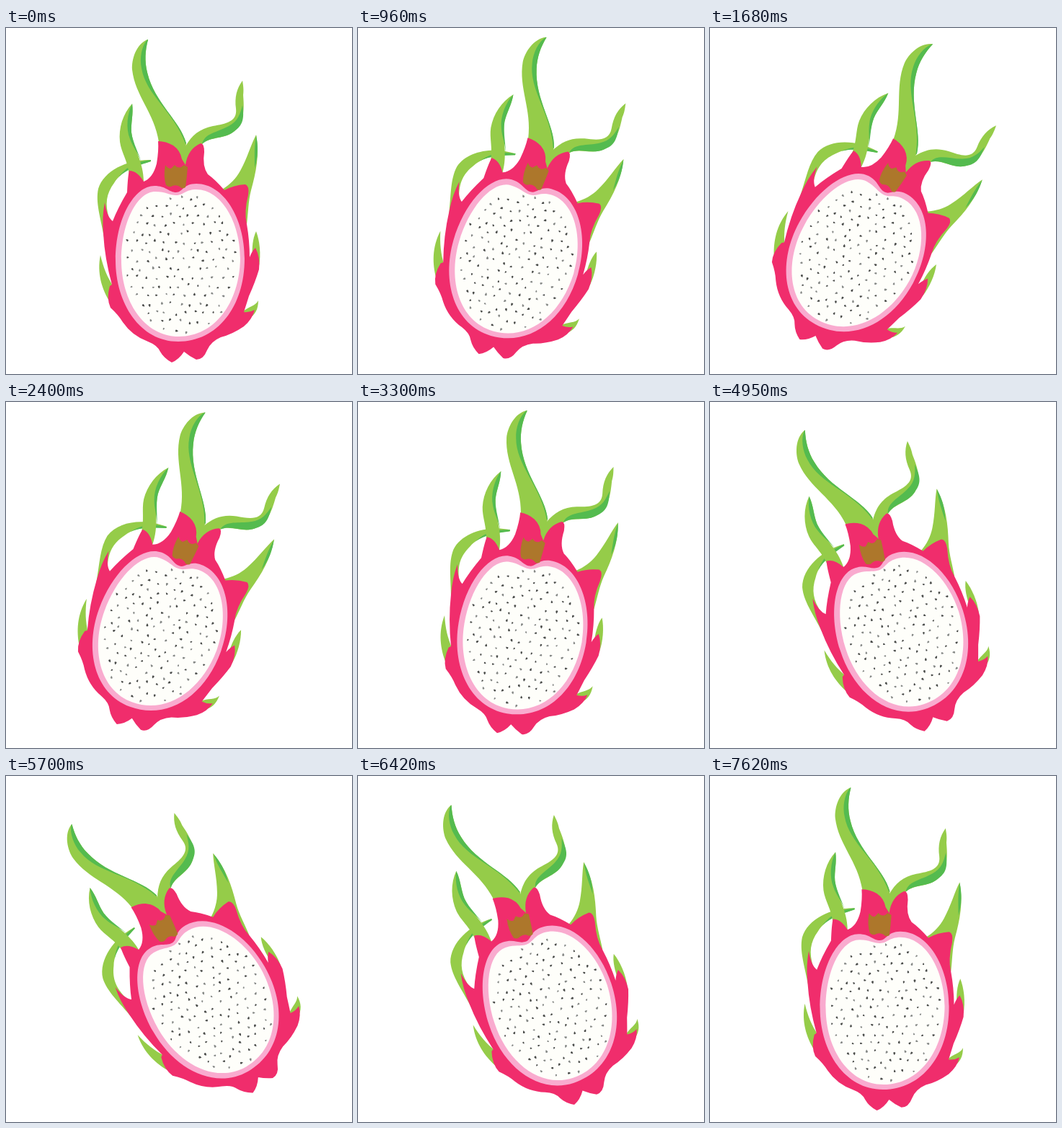
An HTML page with a canvas for the animation above (7650 ms loop, 480x480 px).

```html
<!DOCTYPE html>
<html lang="en">
<head>
<meta charset="utf-8">
<title>Swinging dragon fruit</title>
<style>
  html, body { margin: 0; width: 100%; height: 100%; overflow: hidden; background: #fff; }
  canvas { display: block; width: 100vw; height: 100vh; object-fit: contain; }
</style>
</head>
<body>
<canvas id="stage" width="480" height="480"></canvas>
<script>
const ctx = document.getElementById('stage').getContext('2d');
const LOOP = 7650;
const LIGHT = '#95cc49', DARK = '#54bb4f', PINK = '#f02d6c';
const RING = '#f9abcf', FLESH = '#fefefa', BROWN = '#ad772b';

// Swing angle in degrees at key times in ms
const swing = [
  [0, 0], [1770, 30], [2400, 20.1], [3120, 12.5], [4200, -5.1],
  [5715, -30], [6420, -18.1], [7020, -8.5], [LOOP, 0]
];

const shape = (color, d) => ({ color, path: new Path2D(d) });

const leaves = [
  // left curl
  shape(LIGHT, 'M201 183 C170 182 136 197 128 223 C124 242 131 262 136 290 L143 264 C137 244 139 230 150 215 C161 197 183 190 201 185 Z'),
  shape(DARK, 'M201 183 C184 185 169 190 156 207 C168 195 186 190 201 185 Z'),
  // tall top leaf
  shape(LIGHT, 'M196 16 C180 23 174 44 175 58 C179 94 206 118 212 158 L247 192 L250 160 C242 129 206 104 196 62 C192 46 193 31 197 16 Z'),
  shape(DARK, 'M196 16 C188 25 185 42 188 56 C194 93 233 116 249 161 L250 160 C242 129 206 104 196 62 C192 46 193 31 197 16 Z'),
  // curved leaf to the right of it
  shape(LIGHT, 'M328 73 C320 84 317 96 319 112 C321 130 305 133 287 136 C268 140 258 149 249 164 L244 192 L258 190 L272 161 C284 150 303 155 317 143 C332 130 330 108 329 93 C330 85 329 80 328 73 Z'),
  shape(DARK, 'M272 161 C275 146 293 145 309 136 C322 129 325 119 328 107 C331 127 328 135 317 143 C303 155 285 149 272 161 Z'),
  // upper left leaf
  shape(LIGHT, 'M175 105 C162 119 156 139 158 158 C160 173 169 184 171 205 L191 213 C191 186 177 168 174 145 C173 131 177 120 175 105 Z'),
  shape(DARK, 'M175 105 C168 119 166 139 172 154 C176 166 184 173 189 190 C185 175 176 160 174 145 C173 131 177 120 175 105 Z'),
  // right leaf
  shape(LIGHT, 'M347 148 C340 161 335 180 325 198 C319 209 311 217 300 224 L334 272 C336 258 336 240 340 225 C347 200 352 176 347 148 Z'),
  shape(DARK, 'M347 149 C344 166 345 178 345 194 C350 178 350 164 347 149 Z'),
  // small side shoots
  shape(LIGHT, 'M347 282 C342 292 341 306 342 320 L351 330 C354 314 352 295 347 282 Z'),
  shape(LIGHT, 'M350 378 C346 386 337 386 328 394 L336 404 C346 398 350 390 350 378 Z'),
  shape(LIGHT, 'M131 315 C126 340 133 362 144 380 L150 360 C140 345 135 332 131 315 Z')
];

const fruit = [
  shape(PINK, 'M230 440 L230 200 L249 190 Q252 168 270 160 Q275 160 275 172 Q272 192 280 203 Q290 210 303 225 Q316 218 332 217 Q338 219 336 232 Q330 255 334 272 Q338 295 338 318 Q341 310 346 305 Q353 318 351 335 Q346 352 337 372 Q333 385 330 394 Q338 395 345 391 Q342 404 330 414 Q314 425 298 429 Q284 435 279 447 Q274 460 264 460 Q254 455 247 449 Z'),
  shape(PINK, 'M247 449 Q240 460 230 464 Q219 458 214 449 Q210 440 197 435 Q175 427 162 408 Q156 398 145 388 Q139 375 144 358 L147 356 Q137 320 135 285 Q133 262 137 242 Q140 262 148 268 Q155 250 168 228 Q169 205 171 198 Q182 198 191 213 Q204 208 209 188 Q212 170 211 157 Q222 157 232 163 Q242 170 244 182 L249 190 L260 300 Z'),
  shape(RING, 'M236 228 C245 228 246 216 264 216 C302 216 331 264 331 320 C331 387 293 435 239 435 C186 435 152 382 152 322 C152 264 178 219 206 219 C222 219 226 228 236 228 Z'),
  shape(FLESH, 'M236 232 C246 232 249 224 264 224 C299 224 325 270 325 320 C324 382 289 428 240 428 C191 428 160 378 160 322 C160 270 182 227 207 227 C222 227 226 232 236 232 Z'),
  shape(BROWN, 'M221 190 Q224 195 229 195 L234 190 Q238 195 243 193 L247 190 L252 193 Q251 206 249 221 Q244 224 241 220 Q236 217 231 219 Q227 222 222 218 Q218 206 221 190 Z')
];

function random(seed) {
  return () => {
    seed = (seed * 16807) % 2147483647;
    return seed / 2147483647;
  };
}

// Staggered rows of seeds with a little jitter, kept inside the flesh
function makeSeeds() {
  const rnd = random(4271), seeds = [];
  for (let row = 0; row < 16; row++) {
    for (let col = 0; col < 13; col++) {
      const x = 162 + col * 13.2 + (row % 2) * 6.6 + (rnd() - 0.5) * 6;
      const y = 235 + row * 12.3 + (rnd() - 0.5) * 6;
      const turn = rnd() * Math.PI * 2, size = 1.1 + rnd() * 0.5, tone = rnd();
      const inside = Math.hypot((x - 242) / 79, (y - 326) / 98) < 1;
      if (inside) seeds.push({ x, y, turn, size, color: tone < 0.6 ? '#4a4c4a' : '#858886' });
    }
  }
  return seeds;
}

const seeds = makeSeeds();
const drop = new Path2D('M0 -1.6 Q1.3 0 0.9 0.8 Q0 1.5 -0.9 0.8 Q-1.2 0 0 -1.6 Z');

function angleAt(t) {
  const i = swing.findIndex(key => key[0] > t);
  const [t0, a0] = swing[i - 1], [t1, a1] = swing[i];
  return a0 + (a1 - a0) * (t - t0) / (t1 - t0);
}

function paint({ color, path }) {
  ctx.fillStyle = color;
  ctx.fill(path);
}

function paintSeed(s) {
  ctx.save();
  ctx.translate(s.x, s.y);
  ctx.rotate(s.turn);
  ctx.scale(s.size, s.size);
  paint({ color: s.color, path: drop });
  ctx.restore();
}

function draw(now) {
  ctx.fillStyle = '#fff';
  ctx.fillRect(0, 0, 480, 480);
  ctx.save();
  ctx.translate(240, 240);
  ctx.rotate(angleAt(now % LOOP) * Math.PI / 180);
  ctx.translate(-240, -240);
  leaves.forEach(paint);
  fruit.forEach(paint);
  seeds.forEach(paintSeed);
  ctx.restore();
}

const start = performance.now();
function tick() {
  draw(performance.now() - start);
  requestAnimationFrame(tick);
}
tick();
</script>
</body>
</html>
```
